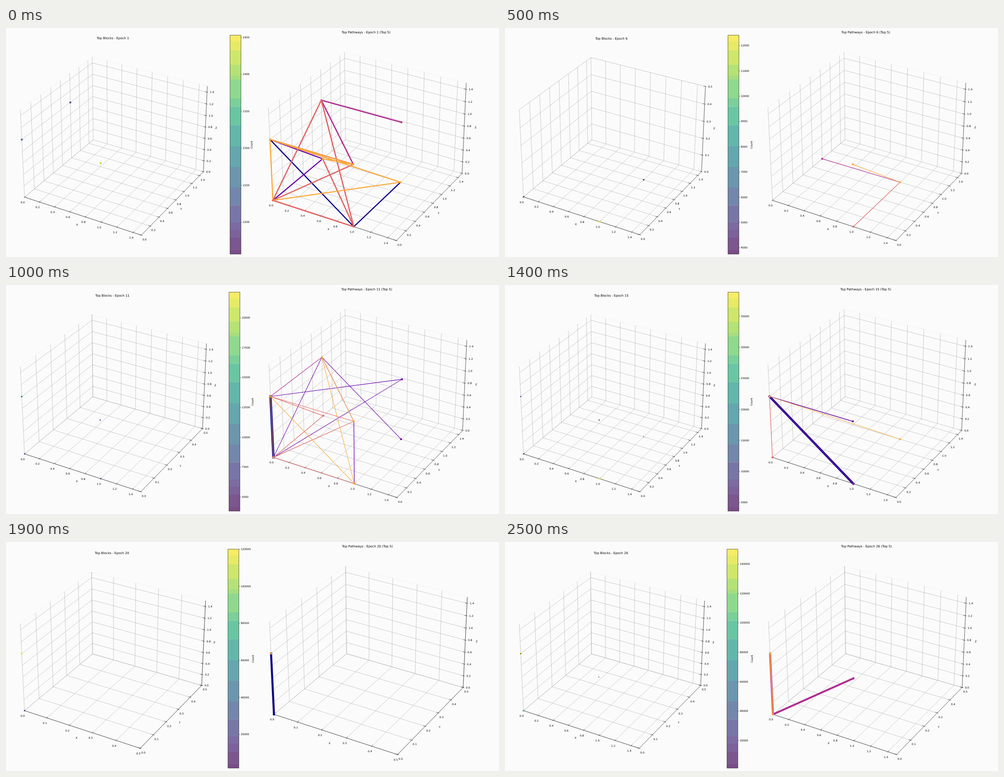
Animation, 1096 px wide and 511 px high, one loop 2.6 s. Source, as an HTML page with a canvas:

```html
<!DOCTYPE html>
<html lang="en">
<head>
<meta charset="utf-8">
<title>Training epochs</title>
<style>
html, body { margin: 0; width: 100%; height: 100%; overflow: hidden; background: #fbfbfb; }
canvas { display: block; width: 1096px; height: 511px; }
</style>
</head>
<body>
<canvas id="stage" width="1096" height="511"></canvas>
<script>
const ctx = document.getElementById('stage').getContext('2d');
const EPOCHS = 26, STEP = 100;
const SMALL = 5.84, LARGE = 7;
const BAR = { top: 16, bottom: 504.5, width: 24.3 };

// navy, violet, magenta, salmon, orange
const PLASMA = { n: '#0d0887', v: '#6a00a8', m: '#b12a90', s: '#e16462', o: '#fca636' };
const VIRIDIS = ['440154', '472d7b', '3b528b', '2c728e', '21918c', '28ae80', '5ec962', 'addc30', 'fde725']
  .map(h => [0, 2, 4].map(i => parseInt(h.slice(i, i + 2), 16)));
const BANDS = [16, 30, 50, 82, 106, 115, 157, 175.5, 216.5, 264, 310, 356, 395.5, 434, 450, 468, 496, 504.5];

// Nodes are written as xyz bits. blocks: node, colour position, radius, dark core.
// paths: colour, width, nodes. ends: colour, nodes.
const SCENES = [
  { epoch: 1, min: 2157, max: 2453,
    blocks: [['001', .27, 2.3], ['011', .12, 2.1], ['101', .89, 2.4]],
    paths: ['n 2.5 001 100 110', 'v 2.5 001 010 000', 'm 2.7 111 011 101 001',
      's 2.7 000 011 100 000 101', 's 2.7 010 100', 'o 2.5 010 101 001 000 110 001'],
    ends: ['m 111', 's 011 000 100', 'o 001 101 110 010'] },
  { epoch: 6, min: 3752, max: 12417,
    blocks: [['000', .1, 1.6], ['100', .97, 2.4], ['110', .1, 1.7, 1]],
    paths: ['m 1.1 010 110', 's 1.1 110 100', 'o 1.1 101 110'],
    ends: ['m 010', 's 100', 'o 101 110'] },
  { epoch: 11, min: 3817, max: 22159,
    blocks: [['001', .7, 2, 1], ['000', .08, 1.4], ['101', .1, 1.3], ['100', .1, 1.3]],
    paths: ['n 5 001 000', 'v 1.1 000 111 001', 'v 1.1 000 011 110', 'v 1.3 101 100',
      'm 1.1 001 011 101', 's 1.1 001 101 000 010 001', 's 1.1 000 100',
      'o 1.1 101 011 100 001 000'],
    ends: ['v 111 110', 's 010', 'o 001 000 011 101 100'] },
  { epoch: 15, min: 3628, max: 38899,
    blocks: [['001', .12, 1.4], ['000', .08, 1.4], ['101', .12, 1.4], ['100', .97, 2.2], ['110', 0, .8, .8]],
    paths: ['n 5 001 100', 'v 2 001 100', 'v 1.5 001 101', 's 1.1 001 000', 'o 1.1 001 110'],
    ends: ['v 101', 'm 100', 's 000', 'o 001 110'] },
  { epoch: 18, min: 2816, max: 94554,
    blocks: [['001', .98, 2.1], ['000', .03, 1.4]],
    paths: ['n 4.6 001 000'],
    ends: ['n 000', 'o 001'] },
  { epoch: 22, min: 911, max: 145475,
    blocks: [['001', .78, 2.1, 1], ['000', .6, 1.9], ['101', .05, 1]],
    paths: ['n 4.4 001 000 101', 's 1.4 001 000 101', 'o 1.1 101 001'],
    ends: ['o 001 000 101'] },
  { epoch: 26, min: 1244, max: 150216,
    blocks: [['001', .98, 2.2, 1], ['000', .65, 1.9], ['101', .05, 1]],
    paths: ['m 4.2 001 000 101', 's 2.6 001 000', 'o 1.6 001 000'],
    ends: ['m 101', 'o 001 000'] }
];

function viridis(t) {
  const p = t * (VIRIDIS.length - 1), i = Math.min(VIRIDIS.length - 2, Math.floor(p));
  const rgb = VIRIDIS[i].map((c, k) => Math.round(c + (VIRIDIS[i + 1][k] - c) * (p - i)));
  return `rgb(${rgb})`;
}

// Perspective view: elevation 30, azimuth -60, eye at distance 10
function project(view, [fx, fy, fz]) {
  const x = (fx - .5) * 1.1905, y = (fy - .5) * 1.1905, z = (fz - .5) * .8929;
  const depth = 10 - (.433 * x - .75 * y + .5 * z);
  return [view.x + view.scale * (.866 * x + .5 * y) / depth,
          254.1 - view.scale * (-.25 * x + .433 * y + .866 * z) / depth];
}

function line(points, color, width, cap = 'butt') {
  ctx.beginPath();
  points.forEach(p => ctx.lineTo(p[0], p[1]));
  ctx.strokeStyle = color;
  ctx.lineWidth = width;
  ctx.lineCap = cap;
  ctx.lineJoin = 'round';
  ctx.stroke();
}

function dot([x, y], r, color) {
  ctx.beginPath();
  ctx.arc(x, y, r, 0, 7);
  ctx.fillStyle = color;
  ctx.fill();
}

function text(str, x, y, size = SMALL, align = 'center') {
  ctx.font = `${size}px "DejaVu Sans", sans-serif`;
  ctx.textAlign = align;
  ctx.textBaseline = 'middle';
  ctx.fillStyle = '#000';
  ctx.fillText(str, x, y);
}

const limitsOf = nodes => [0, 1, 2].map(i => nodes.some(n => n[i] === '1') ? 1.5 : .5);
const place = (view, limits, node) => project(view, limits.map((l, i) => node[i] / l));

function drawAxes(view, limits) {
  const at = (...p) => project(view, p);
  const axes = [
    { grid: t => [[t, 0, 0], [t, 1, 0], [t, 1, 1]], tick: (t, d) => [t, -d, 0], dx: -4.1, dy: 12.2 },
    { grid: t => [[1, t, 0], [0, t, 0], [0, t, 1]], tick: (t, d) => [1 + d, t, 0], dx: 7, dy: 9.8 },
    { grid: t => [[0, 0, t], [0, 1, t], [1, 1, t]], tick: (t, d) => [1 + d, 1, t], dx: 10.8, dy: .8 }
  ];
  line([at(0, 0, 1), at(0, 1, 1), at(1, 1, 1)], '#efefef', .6);
  const ticks = limits.map(l => {
    const step = l > 1 ? .2 : .1, list = [];
    for (let v = 0; v < l + .01; v += step) list.push(v);
    return list;
  });
  axes.forEach((a, i) => ticks[i].forEach(v =>
    line(a.grid(v / limits[i]).map(p => project(view, p)), '#a8a8a8', .6)));
  line([at(0, 0, 0), at(1, 0, 0), at(1, 1, 0), at(1, 1, 1)], '#000', .65);
  axes.forEach((a, i) => ticks[i].forEach(v => {
    const t = v / limits[i], [x, y] = at(...a.tick(t, 0));
    line([at(...a.tick(t, -.016)), at(...a.tick(t, .0085))], '#000', .6);
    text(v.toFixed(1), x + a.dx, y + a.dy);
  }));
  [['X', -.0343, .0741], ['Y', .0583, .0603], ['Z', .0895, -.0121]].forEach(([name, x, y]) =>
    text(name, view.x + x * view.scale, 254.1 + y * view.scale));
}

function tickStep(range) {
  const raw = range / 9, base = 10 ** Math.floor(Math.log10(raw));
  return base * [1, 2, 2.5, 5, 10].find(m => m * base >= raw);
}

function drawBar(left, min, max, labelX) {
  const right = left + BAR.width, height = BAR.bottom - BAR.top;
  ctx.globalAlpha = .7;
  for (let i = 0; i < BANDS.length - 1; i++) {
    const mid = (BANDS[i] + BANDS[i + 1]) / 2;
    ctx.fillStyle = viridis((BAR.bottom - mid) / height);
    ctx.fillRect(left, BANDS[i], BAR.width, BANDS[i + 1] - BANDS[i]);
  }
  ctx.globalAlpha = 1;
  ctx.strokeStyle = '#000';
  ctx.lineWidth = .6;
  ctx.strokeRect(left, BAR.top, BAR.width, height);
  const step = tickStep(max - min);
  for (let v = Math.ceil(min / step) * step; v <= max; v += step) {
    const y = BAR.bottom - height * (v - min) / (max - min);
    line([[right, y], [right + 2, y]], '#000', .6);
    text(String(v), right + 4.2, y + .3, SMALL, 'left');
  }
  ctx.save();
  ctx.translate(labelX, 260.5);
  ctx.rotate(-Math.PI / 2);
  text('Count', 0, 0);
  ctx.restore();
}

function countRange(epoch) {
  const i = Math.max(1, SCENES.findIndex(s => s.epoch >= epoch));
  const a = SCENES[i - 1], b = SCENES[i], t = (epoch - a.epoch) / (b.epoch - a.epoch);
  return [a.min + (b.min - a.min) * t, a.max + (b.max - a.max) * t];
}

function drawEpoch(epoch) {
  const scene = SCENES.reduce((best, s) =>
    Math.abs(s.epoch - epoch) < Math.abs(best.epoch - epoch) ? s : best);
  const [min, max] = countRange(epoch);
  // Wider count labels squeeze the left plot and push the right one
  const k = String(Math.floor(max)).length - 5;
  const left = { x: 242.7 - k, scale: 2487 - 11.5 * k };
  const right = { x: 808.7 + 1.2 * k, scale: 2643 };

  ctx.fillStyle = '#fbfbfb';
  ctx.fillRect(0, 0, 1096, 511);

  const blockLimits = limitsOf(scene.blocks.map(b => b[0]));
  drawAxes(left, blockLimits);
  scene.blocks.forEach(([node, t, r, core]) => {
    const p = place(left, blockLimits, node);
    ctx.globalAlpha = .9;
    dot(p, r, viridis(t));
    ctx.globalAlpha = 1;
    if (core) dot(p, core, '#222233');
  });
  text('Top Blocks - Epoch ' + epoch, 236.6 - k, 23.9 + .9 * k, LARGE);

  drawBar(495.7 - 2.3 * k, min, max, 548 + 1.3 * k);

  const paths = scene.paths.map(p => p.split(' '));
  const pathLimits = limitsOf(paths.flatMap(p => p.slice(2)));
  drawAxes(right, pathLimits);
  paths.forEach(([c, w, ...nodes]) =>
    line(nodes.map(n => place(right, pathLimits, n)), PLASMA[c], +w, 'square'));
  scene.ends.forEach(e => {
    const [c, ...nodes] = e.split(' ');
    nodes.forEach(n => dot(place(right, pathLimits, n), 2.2, PLASMA[c]));
  });
  text(`Top Pathways - Epoch ${epoch} (Top 5)`, 802 + 1.5 * k, 9.9, LARGE);
}

const start = performance.now();
function frame() {
  const t = Math.max(0, performance.now() - start) % (EPOCHS * STEP);
  drawEpoch(Math.floor(t / STEP) + 1);
  requestAnimationFrame(frame);
}
frame();
</script>
</body>
</html>
```
